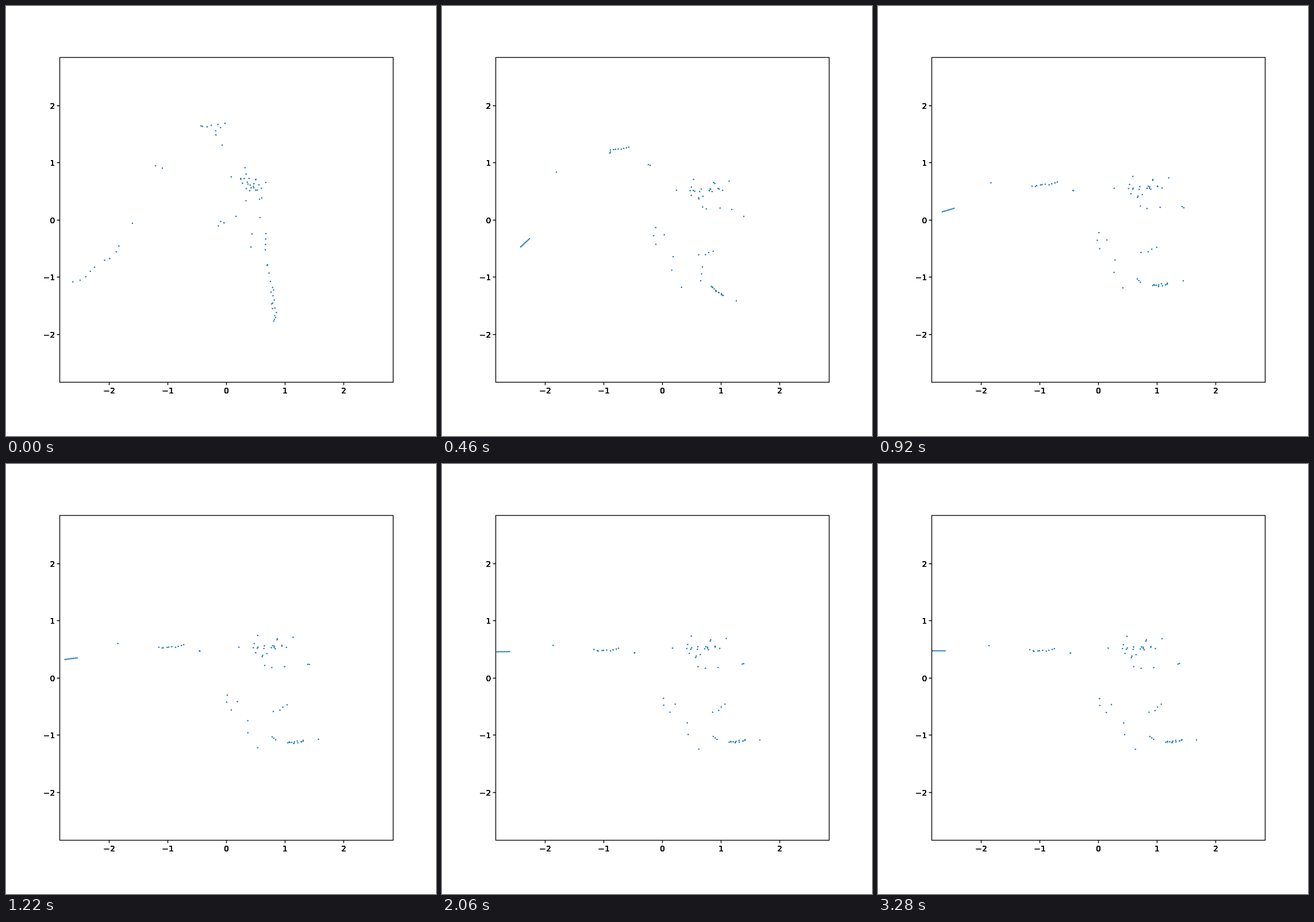
An HTML page with a canvas that plays this animation: 748x748 px, repeating every 3400 ms.

```html
<!DOCTYPE html>
<html lang="en">
<head>
<meta charset="utf-8">
<title>Scatter animation</title>
<style>
html, body { margin: 0; width: 100%; height: 100%; overflow: hidden; background: #fff; }
canvas { display: block; width: 748px; height: 748px; }
</style>
</head>
<body>
<canvas id="stage"></canvas>
<script>
const SIZE = 748, LOOP = 3400, STEP = 20;
const LEG = 460;     // time between the first three poses
const SETTLE = 380;  // time constant of the final approach
const BOX = { x: 93.5, y: 89.5, w: 580, h: 565 };
const MID = { x: 383.35, y: 372.3 }, UNIT = { x: 102.1, y: 99.5 };

// A group strings n dots along a segment [x1, y1, x2, y2, scatter].
// Its four poses are the start, two waypoints and the place of rest.
const groups = [
  { n: 9, poses: [[117,484,195,422,8], [137,419,152,405], [112,358,132,352], [95,325,116.5,325]] },
  { n: 1, poses: [[220,378], [199,289], [196.5,307.5], [193,316]] },
  { n: 2, poses: [[260,278,272,282], [292,256,293,254], [268,313.5,274,314], [264,323,270,325]] },
  { n: 8, poses: [[340,215,370,212,22], [293,251,325,246,1.5], [276,313,312,307,3], [271.5,327,307,322,3]] },
  { n: 2, poses: [[376,242,381,204], [359,276,362,277], [339,321,340,321], [334.5,329,335,329]] },
  { n: 26, poses: [[412,298,436,318,26], [430,328,482,314,33], [436,325,486,309,36], [426,328,474,314,36]] },
  { n: 2, poses: [[441,336,442,368], [504,354,525,366], [529,349,532,351], [522,348,524.4,347]] },
  { n: 7, poses: [[355,360,444,440,25], [360,376,410,482,16], [374,386,420,484,14], [375,400,442,490,14]] },
  { n: 4, poses: [[451,424,452,396], [447,435,474,427,3], [458,431,487,420,3], [472,434,495,418,3]] },
  { n: 3, poses: [[455,450,460,479], [453,454,450,478], [451,475,456.5,480.5], [473,474,479.5,479]] },
  { n: 13, poses: [[461,488,469,546,5], [467,487,490,504,2.5], [476,485,505,483,4], [499,483,530,480,3]] },
  { n: 1, poses: [[466,548], [512,513], [531,478], [554,480]] }
];

let seed = 7;
function random() {
  seed = (seed * 16807) % 2147483647;
  return seed / 2147483647;
}
const jitter = () => random() + random() - 1;

function place([x1, y1, x2 = x1, y2 = y1, scatter = 0], s, jx, jy) {
  return {
    x: x1 + (x2 - x1) * s + scatter * jx,
    y: y1 + (y2 - y1) * s + scatter * jy
  };
}

const dots = groups.flatMap(({ n, poses }) =>
  Array.from({ length: n }, (_, i) => {
    const s = n > 1 ? i / (n - 1) : 0, jx = jitter(), jy = jitter();
    return poses.map(pose => place(pose, s, jx, jy));
  }));

// A parabola through the first three values, then an exponential approach
function move(a, b, c, rest, t) {
  if (t > 2 * LEG) return rest + (c - rest) * Math.exp((2 * LEG - t) / SETTLE);
  const s = t / LEG;
  return a * (1 - s) * (2 - s) / 2 + b * s * (2 - s) + c * s * (s - 1) / 2;
}

const canvas = document.getElementById("stage");
const ctx = canvas.getContext("2d");
const ratio = window.devicePixelRatio || 1;
canvas.width = canvas.height = SIZE * ratio;
ctx.scale(ratio, ratio);

const snap = v => Math.floor(v) + 0.5;

function label(text, x, y) {
  // Repeated fills firm up the soft glyph edges
  for (let i = 0; i < 4; i++) ctx.fillText(text, x, y);
}

function drawAxes() {
  ctx.strokeStyle = ctx.fillStyle = "#000";
  ctx.lineWidth = 1.35;
  ctx.strokeRect(BOX.x, BOX.y, BOX.w, BOX.h);
  ctx.font = '13.89px "DejaVu Sans", sans-serif';
  ctx.beginPath();
  for (let n = -2; n <= 2; n++) {
    const x = snap(MID.x + n * UNIT.x), y = snap(MID.y - n * UNIT.y);
    const text = n < 0 ? "\u2212" + -n : String(n);
    ctx.moveTo(x, BOX.y + BOX.h);
    ctx.lineTo(x, BOX.y + BOX.h + 4.9);
    ctx.moveTo(BOX.x, y);
    ctx.lineTo(BOX.x - 4.9, y);
    ctx.textAlign = "center";
    label(text, x, 674);
    ctx.textAlign = "right";
    label(text, 85.3, y + 5);
  }
  ctx.stroke();
}

function draw(t) {
  ctx.fillStyle = "#fff";
  ctx.fillRect(0, 0, SIZE, SIZE);
  ctx.save();
  ctx.beginPath();
  ctx.rect(BOX.x, BOX.y, BOX.w, BOX.h);
  ctx.clip();
  ctx.fillStyle = "#1f77b4";
  for (const [a, b, c, rest] of dots) {
    ctx.beginPath();
    ctx.arc(move(a.x, b.x, c.x, rest.x, t), move(a.y, b.y, c.y, rest.y, t), 1.25, 0, 2 * Math.PI);
    ctx.fill();
  }
  ctx.restore();
  drawAxes();
}

const begin = performance.now();
function tick() {
  const t = Math.floor(((performance.now() - begin) % LOOP) / STEP) * STEP;
  draw(t < 3280 ? Math.min(t, 3160) : 3280);
  requestAnimationFrame(tick);
}
tick();
</script>
</body>
</html>
```
